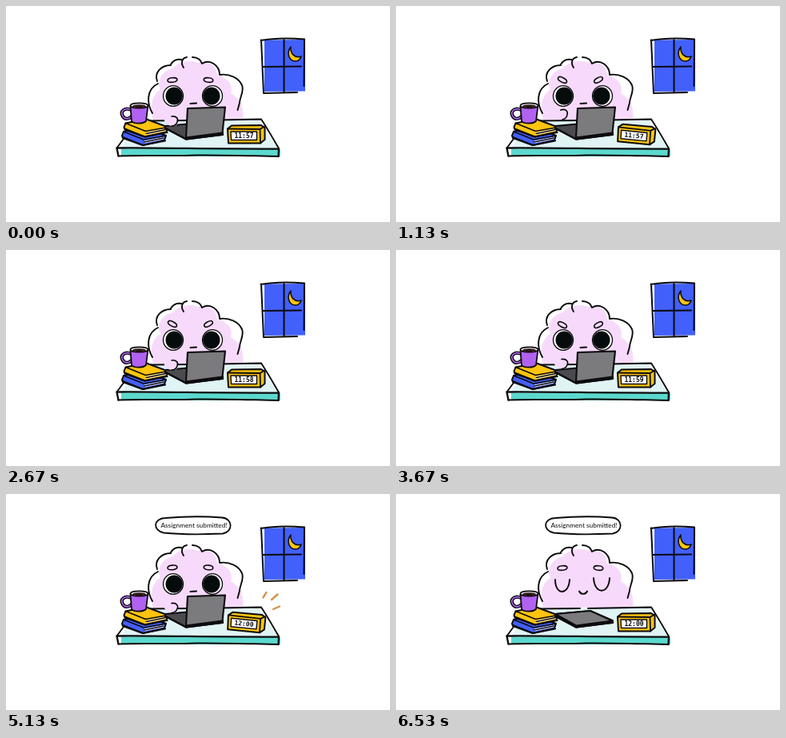
An HTML page with a canvas for the animation above (7.07 s loop, 480 by 270 pixels).

```html
<!DOCTYPE html>
<html lang="en">
<head>
<meta charset="utf-8">
<title>Late night assignment</title>
<style>
html, body { margin: 0; width: 100%; height: 100%; overflow: hidden; background: #fff; }
canvas { display: block; width: 480px; height: 270px; }
</style>
</head>
<body>
<canvas id="stage"></canvas>
<script>
const LOOP = 7070, FPS = 15;
const INK = '#0b0a0c', PINK = '#f7dafb', TEAL = '#5cd8cd', YELLOW = '#fec40f', BLUE = '#4260fb', VIOLET = '#b162f0';
const canvas = document.getElementById('stage');
const ctx = canvas.getContext('2d');
const dpr = window.devicePixelRatio || 1;
canvas.width = 480 * dpr;
canvas.height = 270 * dpr;

const clamp = x => Math.max(0, Math.min(1, x));
const ramp = (t, a, b) => { const x = clamp((t - a) / (b - a)); return x * x * (3 - 2 * x); };
const between = (t, a, b) => t >= a && t < b;
const mix = (a, b, k) => a + (b - a) * k;

function fill(d, color) {
  ctx.fillStyle = color;
  ctx.fill(new Path2D(d));
}
function line(d, width = 1.9, color = INK) {
  ctx.strokeStyle = color;
  ctx.lineWidth = width;
  ctx.stroke(new Path2D(d));
}
function shape(d, color, width) {
  fill(d, color);
  line(d, width);
}
function oval(x, y, rx, ry, color, width) {
  ctx.beginPath();
  ctx.ellipse(x, y, rx, ry, 0, 0, 7);
  ctx.fillStyle = color;
  ctx.fill();
  if (!width) return;
  ctx.strokeStyle = INK;
  ctx.lineWidth = width;
  ctx.stroke();
}
// Draw with the origin moved to a pivot
function at(x, y, angle, scale, draw) {
  ctx.save();
  ctx.translate(x, y);
  ctx.rotate(angle);
  ctx.scale(scale, scale);
  draw();
  ctx.restore();
}

function drawWindow() {
  fill('M323 42.5L374 42L374 106.5L323 107Z', BLUE);
  line('M318.5 43C335 40 355 40 373 41.5L372.5 100M319 42.5L322 109M322 109L364 108M347.5 42L347.5 107M321 76L369 75.5', 2);
  shape('M356 51C350 59 354 69 362 69C366 69 368 66 369 63C361 66 355 59 356 51Z', YELLOW, 1.5);
}

function drawBody() {
  fill('M184 142C178 126 183 110 193 105C187 93 196 81 208 78C216 70 229 66 240 71C256 68 263 76 264 87C275 89 285 97 281 109C294 116 298 130 296 142Z', PINK);
  line('M183 134C176 122 175 104 190 97M189 94C185 83 194 74 206 74M206 73C209 68 214 66 219 67' +
       'M222 77C218 71 220 65 226 64M233 64C240 64 244 68 245 72M245 72C255 66 267 74 267 86' +
       'M267 86C279 84 291 90 295 99C298 107 292 114 292 121L289.5 130');
}

function drawBrows(frown, bob) {
  const y = 92.5 + frown * 0.5 + bob;
  at(208, y, mix(-0.1, 0.5, frown), 1, () => oval(0, 0, 6, 2.8, PINK, 1.6));
  at(253, y, mix(0.1, -0.5, frown), 1, () => oval(0, 0, 5.8, 2.8, PINK, 1.6));
}

function drawEye(x, y, look) {
  oval(x, y, 12.5, 12.8, '#fff', 1.3);
  oval(x + look, y, 10.7, 11, '#060c0c');
}

function drawFace(t) {
  const frown = ramp(t, 600, 800) * (1 - ramp(t, 4660, 4800));
  const typing = 1 - ramp(t, 5700, 5930);
  const shut = ramp(t, 5930, 6200);
  drawBrows(frown, 0.7 * Math.sin(t * Math.PI / 200) * typing);
  if (shut < 0.6) {
    ctx.save();
    ctx.beginPath();
    ctx.rect(190, 98 + shut * 24, 90, 30);
    ctx.clip();
    drawEye(209, 112.5, 1.2);
    drawEye(258, 112.5, -1.2);
    ctx.restore();
    line('M230.5 122L238 121.5', 2);
  } else {
    line('M199 107C199 127 216 127 217 107M247 105C248 126 266 126 267 105');
    line('M229 121.5C231 126 237 126 239 121.5');
  }
}

function drawSweat(t) {
  if (!between(t, 4000, 4750)) return;
  const grow = ramp(t, 3950, 4150);
  at(278, 114 + 3 * ramp(t, 4050, 4450), -0.12, grow, () =>
    shape('M-1 -7C2 -3 5 0 4 4C3 8 -4 8 -4.5 3C-4.5 0 -2 -3 -1 -7Z', TEAL, 1.4));
}

function drawDesk() {
  fill('M166 144L315 142.5L340 178L143 179Z', '#e0f3f5');
  fill('M144 178.5L343 179L343 188L144 188Z', TEAL);
  line('M177 143.5L230 143M240 143L319 141.5C326 152 334 166 341 178M150 162L138.5 177.5');
  line('M138.5 177.5C190 177 270 179 341 178.5M138.5 177.5L140.5 187.5M341 178.5L340.5 188', 2.3);
  line('M140.5 187.5C170 186 205 188 238 186.5C270 186 310 187.5 340.5 188', 2);
}

function drawBook(x, y, color) {
  at(x, y, 0, 1, () => {
    shape('M0 5L2 0L28 -5L55 5L53 11L26 17L1 8Z', color, 2);
    fill('M28 11.5L53 6.5L52 9.5L28 14.5Z', '#fff');
    line('M2 0L27 10L55 5M28 13L52 8', 1.6);
    line('M1 7L26 17L54 11.5', 2.2);
  });
}

function drawMug() {
  const handle = 'M157 130C148 126 143 132 145.5 137C148 142 153 142 157 138';
  line(handle, 4.4);
  line(handle, 1.6, VIOLET);
  shape('M155.5 125L157 144C160 147.5 171 147.5 175 144L177.5 124.5Z', VIOLET, 1.8);
  oval(166.5, 124.5, 11, 3.2, '#fff', 1.7);
  oval(166.5, 125.2, 8.5, 2, '#2b1616');
}

function drawHand(t) {
  const away = ramp(t, 5500, 5850);
  if (away === 1) return;
  const raise = ramp(t, 950, 1090) * (1 - ramp(t, 1190, 1350));
  const tap = Math.abs(Math.sin(t * Math.PI / 266.7)) * 2 * (1 - raise);
  ctx.save();
  ctx.globalAlpha = 1 - away;
  at(207, 144 - tap - raise * 8, -0.2 * raise, 1, () => {
    fill('M-9 -7C-4 -8 2 -6 6 -3C9 1 7 7 3 6C-3 6 -7 4 -9 0Z', PINK);
    line('M0 -6C6 -7 9 -3 7 1C6 4 3 6 0 6', 1.6);
  });
  ctx.restore();
}

function drawLaptop(t) {
  const k = ramp(t, 5980, 6330);
  const lx = mix(227, 199, k), ly = mix(128, 150, k);
  const rx = mix(274, 243, k), ry = mix(126.5, 146, k);
  shape('M199 150L243 146L271 158L271 161L225 166.5L199 153Z', '#4b4a4e', 1.9);
  if (k < 1) drawHand(t);
  shape(`M${lx} ${ly}L${rx} ${ry}L270.5 158.5L225 164.5Z`, '#7b7a7d', 2.1);
  line('M199 152.5L225 166.5L271 160.5', 2.5);
}

function drawClock(t) {
  const shaking = [[1060, 1330], [2870, 3130], [4600, 5150]].some(([a, b]) => between(t, a, b));
  const tilt = shaking ? 0.1 * Math.cos((t - 1133) * Math.PI / 133.3) : 0;
  const time = t < 1250 ? '11:57' : t < 3050 ? '11:58' : t < 4740 ? '11:59' : '12:00';
  at(299, 162, tilt, 1, () => {
    shape('M-22 -8.5L-17 -12.5L20 -13L24.5 -10L24.5 5L19 9.5L-21 9.5Z', YELLOW, 2);
    line('M-22 -8.5L18.5 -8L24 -11.5M18.5 -8L19 9.5', 1.8);
    shape('M-18 -5L14.5 -5L14.5 5.5L-17.5 5.5Z', '#fff', 1.4);
    ctx.fillStyle = INK;
    ctx.font = 'bold 8px "DejaVu Sans Mono", monospace';
    ctx.fillText(time, -1.5, 0.8);
  });
}

function drawSparks(t) {
  if (!between(t, 4740, 5750)) return;
  const push = 0.8 * Math.sin((t - 5133) * Math.PI / 200);
  at(push, -push, 0, 1, () => line('M321.5 129.5L325.5 123M332 132L339.5 125.5M334 144L342 140.5', 2.4, '#d0944e'));
}

function drawBubble(t) {
  if (t < 4740) return;
  at(234, 39.5, 0, ramp(t, 4700, 4960), () => {
    shape('M-35 -9.5C-12 -11.5 18 -11.5 36 -10C50 -9 50 8 37 10C15 11 -18 11 -37 9C-51 6 -50 -9 -35 -9.5Z', '#fff', 1.8);
    ctx.fillStyle = INK;
    ctx.font = '8.3px Lato, sans-serif';
    ctx.fillText('Assignment submitted!', 1, 0);
  });
}

function frame(now) {
  const t = Math.floor(((now % LOOP) + 5) * FPS / 1000) * 1000 / FPS;
  ctx.setTransform(dpr, 0, 0, dpr, 0, 0);
  ctx.fillStyle = '#fff';
  ctx.fillRect(0, 0, 480, 270);
  ctx.lineCap = ctx.lineJoin = 'round';
  ctx.textAlign = 'center';
  ctx.textBaseline = 'middle';
  drawWindow();
  drawBody();
  drawFace(t);
  drawSweat(t);
  drawDesk();
  drawBook(145, 157, BLUE);
  drawBook(147.5, 146.5, YELLOW);
  drawMug();
  drawLaptop(t);
  drawClock(t);
  drawSparks(t);
  drawBubble(t);
  requestAnimationFrame(frame);
}
requestAnimationFrame(frame);
</script>
</body>
</html>
```
